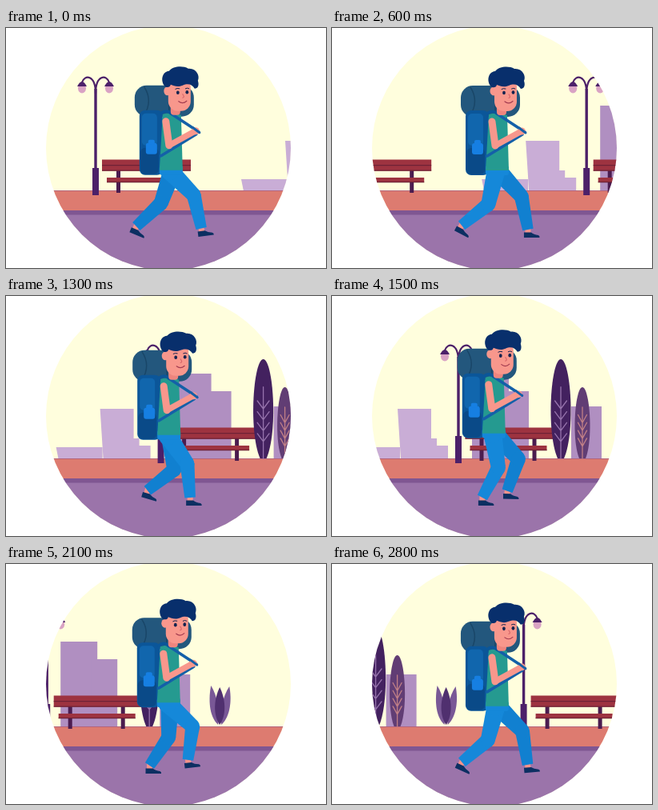
Recreate the animation shown at these times as an HTML page with a canvas. Size 400 px wide and 300 px high, loop 2.9 s.

```html
<!DOCTYPE html>
<html lang="en">
<head>
<meta charset="utf-8">
<title>Backpacker walk</title>
<style>
html, body { margin: 0; width: 100%; height: 100%; overflow: hidden; background: #fff; }
canvas { display: block; }
</style>
</head>
<body>
<canvas id="stage" width="400" height="300"></canvas>
<script>
const ctx = document.getElementById('stage').getContext('2d');
const LOOP = 2900, TICK = 100;
const SCROLL = 0.178;   // px per ms
const STEP = 558;       // ms per step
const BONE = 42.5;      // thigh and shin length

function rect(color, x, y, w, h, r = 0) {
  ctx.fillStyle = color;
  ctx.beginPath();
  ctx.roundRect(x, y, w, h, r);
  ctx.fill();
}
function oval(color, x, y, rx, ry = rx) {
  ctx.fillStyle = color;
  ctx.beginPath();
  ctx.ellipse(x, y, rx, ry, 0, 0, 7);
  ctx.fill();
}
function fill(color, d) {
  ctx.fillStyle = color;
  ctx.fill(new Path2D(d));
}
function line(color, width, d, cap = 'round') {
  ctx.strokeStyle = color;
  ctx.lineWidth = width;
  ctx.lineCap = cap;
  ctx.lineJoin = 'round';
  ctx.stroke(new Path2D(d));
}
function at(x, y, draw) {
  ctx.save();
  ctx.translate(x, y);
  draw();
  ctx.restore();
}
const ease = p => p * p * (3 - 2 * p);
const mix = (a, b, u) => a + (b - a) * u;

function city() {
  const c = '#b08fc1', light = '#c9add6';
  fill(light, 'M294 189H352V204H297Z');
  fill(light, 'M349 141H391V178H398V187H412V204H353Z');
  rect(c, 442, 97, 46, 107);
  rect(c, 480, 119, 33, 85);
  rect(c, 566, 138, 38, 66);
}

function lamp() {
  const c = '#4c2069';
  line(c, 2.2, 'M0 82C0 58 -14 58 -17 68M0 82C0 58 14 58 17 68');
  line(c, 3.4, 'M0 76V180', 'butt');
  rect(c, -4, 175, 8, 34);
  for (const x of [-17, 17]) {
    oval('#d9a3c4', x, 75.5, 5, 6);
    fill(c, `M${x - 6} 73Q${x} 61 ${x + 6} 73Z`);
  }
}

function bench() {
  for (const x of [18, 84]) rect('#4b1c4f', x, 176, 5, 30);
  rect('#9d3340', 0, 164.5, 111, 14);
  rect('#6f2236', 0, 171, 111, 1.3);
  rect('#6f2236', 0, 177.5, 111, 1.2);
  rect('#9d3340', 6, 187, 96, 6);
  rect('#6f2236', 6, 192, 96, 1.3);
}

function tree(color, vein, top, half) {
  const h = 203 - top;
  fill(color, `M0 ${top}C${half * .9} ${top} ${half * 1.4} ${top + h * .72} 4 203H-4
    C${-half * 1.4} ${top + h * .72} ${-half * .9} ${top} 0 ${top}Z`);
  let d = `M0 ${top + h * .28}V203`;
  for (let i = 0; i < 4; i++) {
    const y = top + h * (.5 + i * .11), w = half * .55;
    d += `M${-w} ${y - 10}L0 ${y}L${w} ${y - 10}`;
  }
  line(vein, 1.3, d);
}

function plant() {
  fill('#795896', 'M-2 201C-14 190 -14 168 -11 152C-3 165 0 182 -2 201Z');
  fill('#795896', 'M2 201C14 190 15 168 12 153C4 165 0 182 2 201Z');
  fill('#50306f', 'M0 201C-9 188 -7 168 0 154C7 168 9 188 0 201Z');
}

function scenery(t) {
  rect('#fffedd', 0, 0, 400, 300);
  at(-SCROLL * t, 0, () => {
    city();
    for (let i = 0; i < 3; i++) {
      at(112 + 313 * i, 0, lamp);
    }
  });
  rect('#dd7b70', 0, 203.5, 400, 25);
  rect('#b3647c', 0, 203, 400, 1);
  rect('#9b74aa', 0, 228, 400, 72);
  rect('#7f5692', 0, 228, 400, 5.5);
  at(-SCROLL * t, 0, () => {
    for (let i = 0; i < 3; i++) {
      rect('#4c2069', 108 + 313 * i, 203, 8, 6);
      at(120 + 313.5 * i, 0, bench);
    }
    at(553, 0, () => tree('#43215f', '#9673ac', 79, 13.5));
    at(580, 0, () => tree('#613d74', '#c07f86', 114, 10));
    at(641, 0, plant);
  });
}

function limb(color, a, b, wa, wb) {
  const len = Math.hypot(b.x - a.x, b.y - a.y);
  const nx = -(b.y - a.y) / len, ny = (b.x - a.x) / len;
  ctx.fillStyle = color;
  ctx.beginPath();
  ctx.moveTo(a.x + nx * wa, a.y + ny * wa);
  ctx.lineTo(b.x + nx * wb, b.y + ny * wb);
  ctx.lineTo(b.x - nx * wb, b.y - ny * wb);
  ctx.lineTo(a.x - nx * wa, a.y - ny * wa);
  ctx.fill();
}

function leg(color, hip, foot) {
  const dx = foot.x - hip.x, dy = foot.y - hip.y, len = Math.hypot(dx, dy);
  const bend = Math.sqrt(Math.max(0, BONE ** 2 - len * len / 4)) / len;
  const knee = { x: hip.x + dx / 2 + dy * bend, y: hip.y + dy / 2 - dx * bend };
  at(foot.x, foot.y, () => {
    ctx.rotate(foot.turn);
    rect('#f4938b', -3.5, -4, 7, 9);
    fill('#0c2f62', 'M-5 3.5H4Q7 6 13 7Q15 8 14.5 10H-5Z');
  });
  limb(color, knee, foot, 9, 6.8);
  limb(color, hip, knee, 11.5, 9);
  oval(color, knee.x, knee.y, 9);
  oval(color, hip.x, hip.y, 11.5);
}

function stanceFoot(p) {
  const lift = Math.max(0, (p - .7) / .3);
  return { x: mix(245, 162, ease(p)), y: 252 - 5 * lift, turn: .5 * lift };
}
function swingFoot(p) {
  return {
    x: mix(162, 245, ease(p)),
    y: mix(247, 252, p) - 7 * Math.sin(Math.PI * p),
    turn: p < .65 ? mix(.5, 0, p / .65) : -.25 * Math.sin(Math.PI * (p - .65) / .35)
  };
}

function pack() {
  rect('#23577d', 161, 72, 74, 39, 15);
  line('#194668', 1.5, 'M173 74Q184 91 173 109M204 74V108');
  rect('#0b5699', 167, 103, 29, 81, 7);
  rect('#1166ad', 170, 107, 19, 40, 5);
  rect('#0a4a88', 168, 150, 23, 33, 6);
  rect('#167fe2', 175, 144, 14, 14, 3);
  rect('#167fe2', 178, 140, 8, 6, 2);
}

function torso() {
  fill('#259a90', 'M196 108Q208 104 219 109L221 178H192Z');
  line('#1460a8', 3.6, 'M194 160L238 133');
  line('#f8978c', 9, 'M200 117L204 147');
  line('#f8978c', 7.5, 'M204 147L235 130');
  line('#1460a8', 3.6, 'M206 107L241 130');
  oval('#f8978c', 237, 129, 5, 4.5);
  line('#1460a8', 3, 'M234 125L242 131');
  line('#0b5699', 4, 'M194 107Q200 102 207 107');
}

function head(blink) {
  const ink = '#14234f';
  rect('#ee857e', 206, 96, 12, 13, 4);
  rect('#f8978c', 203, 62, 28, 42, 12);
  oval('#f8978c', 202, 79, 4.5, 5.5);
  fill('#082f6c', `M200 74C193 69 194 55 204 54C209 48 221 47 228 51C238 50 243 60 240 66
    C242 72 240 76 236 76C233 71 228 69 221 72C214 75 210 72 206 71Q205 75 200 74Z`);
  if (blink) {
    line(ink, 1.2, 'M212.5 81Q215 83 217.5 81M224 80.5Q226.5 82.5 229 80.5');
  } else {
    oval(ink, 215, 81, 1.9, 2.3);
    oval(ink, 226.5, 80.5, 1.9, 2.3);
    line(ink, 1, 'M212 76.5Q214 75 217 76M224.5 76Q227 74.5 229 76');
  }
  line('#d8686b', 1.2, 'M221 83Q224 87 221 87.5');
  line('#a33c50', 1.2, 'M216 92Q221 96 226 91.5');
}

function walker(t) {
  const cycle = t / STEP + .94, step = Math.floor(cycle), p = cycle - step;
  const rise = Math.sin(Math.PI * p) ** 2;
  const dx = -5 * rise, dy = -7.5 * rise;
  const feet = [stanceFoot(p), swingFoot(p)];
  if (step % 2) feet.reverse();
  leg('#1180d0', { x: 208 + dx, y: 179 + dy }, feet[0]);
  at(dx, dy, pack);
  leg('#1588d9', { x: 205 + dx, y: 179 + dy }, feet[1]);
  at(dx, dy, () => {
    rect('#1588d9', 192, 172, 29, 12, 3);
    torso();
    head(t >= 1600 && t < 1800);
  });
}

function frame(now) {
  const t = Math.floor(now % LOOP / TICK) * TICK;
  ctx.clearRect(0, 0, 400, 300);
  ctx.save();
  ctx.beginPath();
  ctx.arc(203, 150, 153, 0, 7);
  ctx.clip();
  scenery(t);
  walker(t);
  ctx.restore();
  requestAnimationFrame(frame);
}
let start;
requestAnimationFrame(function begin(now) {
  start = now;
  const run = time => { frameAt(time - start); requestAnimationFrame(run); };
  const frameAt = ms => {
    const t = Math.floor(ms % LOOP / TICK) * TICK;
    ctx.clearRect(0, 0, 400, 300);
    ctx.save();
    ctx.beginPath();
    ctx.arc(203, 150, 153, 0, 7);
    ctx.clip();
    scenery(t);
    walker(t);
    ctx.restore();
  };
  run(now);
});
</script>
</body>
</html>
```
